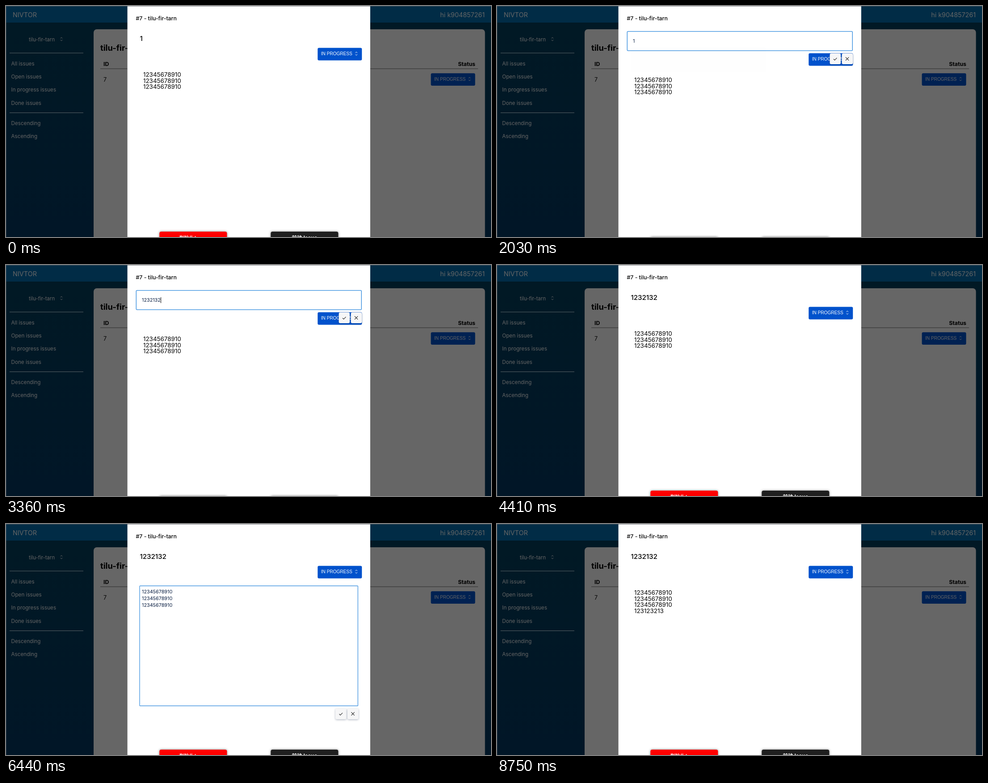
Animation, 1085 px wide and 516 px high, one loop 9.59 s. Source, as an HTML page with a canvas:

```html
<!DOCTYPE html>
<html lang="en">
<head>
<meta charset="utf-8">
<title>Issue editor</title>
<style>
html, body { margin: 0; width: 100%; height: 100%; overflow: hidden; background: #fff; }
canvas { display: block; }
</style>
</head>
<body>
<canvas id="stage" width="1085" height="516"></canvas>
<script>
const ctx = document.getElementById('stage').getContext('2d');
const LOOP = 9590;
const UI = 'Inter, "Noto Sans CJK TC", "Noto Sans CJK", sans-serif';
const ARIAL = '"Liberation Sans", Arial, sans-serif';
const PROJECT = 'tilu-fir-tarn';
const TITLE = '1232132', LINE = '12345678910', EXTRA = '123123213';

function text(str, x, y, size, color = '#000', weight = 400, align = 'left', family = UI) {
  ctx.font = `${weight} ${size}px ${family}`;
  ctx.fillStyle = color;
  ctx.textAlign = align;
  ctx.fillText(str, x, y);
  return ctx.measureText(str).width;
}

function box(x, y, w, h, fill, r = 0, shadow) {
  ctx.save();
  if (shadow) [ctx.shadowColor, ctx.shadowBlur, ctx.shadowOffsetY] = shadow;
  ctx.fillStyle = fill;
  ctx.beginPath();
  ctx.roundRect(x, y, w, h, r);
  ctx.fill();
  ctx.restore();
}

function frame(x, y, w, h, color, width, r) {
  ctx.strokeStyle = color;
  ctx.lineWidth = width;
  ctx.beginPath();
  ctx.roundRect(x + width / 2, y + width / 2, w - width, h - width, r);
  ctx.stroke();
}

function lines(color, width, ...paths) {
  ctx.strokeStyle = color;
  ctx.lineWidth = width;
  ctx.beginPath();
  for (const p of paths)
    p.forEach(([x, y], i) => i ? ctx.lineTo(x, y) : ctx.moveTo(x, y));
  ctx.stroke();
}

function chevrons(x, y, color) {
  lines(color, 1, [[x - 2.3, y - 1.6], [x, y - 3.8], [x + 2.3, y - 1.6]],
                  [[x - 2.3, y + 1.6], [x, y + 3.8], [x + 2.3, y + 1.6]]);
}

function cross(x, y, r, color) {
  lines(color, 1.1, [[x - r, y - r], [x + r, y + r]], [[x + r, y - r], [x - r, y + r]]);
}

function statusButton(x, y, fill, color) {
  box(x, y, 99, 27.8, fill, 3);
  text('IN PROGRESS', x + 7.5, y + 16.6, 10.1, color, 400, 'left', ARIAL);
  chevrons(x + 86.5, y + 12.8, color);
}

function confirmButtons(x, y, hover) {
  const shadow = ['rgba(9,30,66,.3)', 4, 1.5];
  box(x, y, 24.5, 24, hover ? '#e4e6ea' : '#f6f6f7', 3, shadow);
  box(x + 27, y, 24.5, 24, '#f6f6f7', 3, shadow);
  lines('#222', 1.1, [[x + 8.5, y + 12.5], [x + 11, y + 15], [x + 15.8, y + 9.8]]);
  cross(x + 39, y + 12, 3.6, '#222');
}

function actionButton(x, y, fill, label, size) {
  box(x, y, 151, 34, fill, 4, ['rgba(0,0,0,.5)', 5, 0]);
  text(label, x + 75.5, y + 18.5, size, '#fff', 700, 'center');
}

function caret(x, y) { box(Math.round(x), y, 1, 13, '#000'); }

const ramp = (t, start, length) => Math.min(1, Math.max(0, (t - start) / length));
const step = (t, times) => times.filter(at => t >= at).length;
const between = (t, a, b) => t >= a && t < b;
const focusColor = k => `rgb(${204 - 128 * k},${204 - 50 * k},${204 + 22 * k})`;
const hoverColor = k => `rgba(235,236,238,${k})`;

function drawPage() {
  const pale = '#666';
  const side = ctx.createLinearGradient(0, 37, 0, 516);
  side.addColorStop(0, '#011925');
  side.addColorStop(1, '#011627');
  box(0, 0, 1085, 516, side);
  box(0, 0, 1085, 37, '#012c46');
  text('NIVTOR', 15, 25, 14.5, pale);
  text('hi k904857261', 1071, 25, 14.3, pale, 400, 'right');
  text(PROJECT, 51, 79, 11.4, pale);
  chevrons(124, 74, pale);
  ['All issues', 'Open issues', 'In progress issues', 'Done issues']
    .forEach((s, i) => text(s, 11.5, 132.5 + 29.4 * i, 11.7, pale));
  ['Descending', 'Ascending'].forEach((s, i) => text(s, 11.5, 266 + 29.4 * i, 11.7, pale));
  for (const y of [104.5, 238]) box(8, y, 165, 1, '#5c6367');

  box(196, 52, 875.5, 480, '#666', 7);
  text(PROJECT, 211, 100, 18.2, '#000', 700);
  text('ID', 218, 133.5, 12.3, '#000', 700);
  text('Status', 1050, 133.5, 12.3, '#000', 700, 'right');
  box(211, 139.5, 845, 1.2, '#393939');
  text('7', 218, 168.5, 12.5);
  statusButton(950.5, 150.3, '#002152', pale);
}

function drawTitle(t, editing) {
  if (!editing) {
    const hover = t < 1050 ? ramp(t, 630, 140)
      : t < 1330 ? 1 - ramp(t, 980, 140) : t < 1540 ? ramp(t, 1260, 140) : 0;
    box(290.5, 56, 505.5, 32.5, hoverColor(hover), 2);
    text(t < 1540 ? '1' : TITLE, 299.5, 78, 15.1, '#000', 500);
    return;
  }
  frame(290.5, 56, 505.5, 44.5, focusColor(ramp(t, 1540, 70)), 1.6, 2);
  const typed = TITLE.slice(0, 1 + step(t, [2590, 2800, 2940, 3080, 3220, 3360]));
  const width = text(typed, 304, 82, 10.8, '#091e42');
  if (!between(t, 2030, 2590) && t < 3850) caret(304 + width, 72);
}

function drawSavedData(t) {
  ctx.globalAlpha = ramp(t, 2030, 210);
  box(299, 92, 303, 55.5, '#4a4a4a', 3, ['rgba(0,0,0,.4)', 10, 3]);
  text('Saved data', 311, 108.5, 8.5, '#b9b9b9', 500);
  cross(590, 105.5, 3.2, '#d5d5d5');
  text('123', 309.5, 134.5, 9.3, '#fff', 600);
  ctx.globalAlpha = 1;
}

function drawDescription(t, shift) {
  const rows = [LINE, LINE, LINE];
  if (!between(t, 5390, 8750)) {
    if (t >= 8750) rows.push(EXTRA);
    if (t < 5390) box(298.5, 137.5 + shift, 489.5, 57, hoverColor(ramp(t, 4760, 210)), 2);
    rows.forEach((s, i) => text(s, 307, 158 + shift + 13.6 * i, 13.4));
    return;
  }
  const focus = ramp(t, 5390, 210);
  frame(298.3, 137.5, 489.7, 269.5, focusColor(focus), 1.1 + 0.3 * focus, 1);
  const counts = [0, 1, 3, 4, 6, 7, 9];
  if (t >= 6580) rows.push(EXTRA.slice(0, counts[step(t, [6930, 7000, 7140, 7210, 7350, 7420])]));
  const widths = rows.map((s, i) => text(s, 304, 154.7 + 15.1 * i, 10.8, '#091e42'));
  const last = rows.length - 1;
  const hidden = between(t, 6440, 6580) || between(t, 7980, 8470);
  if (t < 5950) caret(304, 144.5);
  else if (!hidden) caret(304 + widths[last], 144.5 + 15 * last);
  confirmButtons(737, 412, t >= 8260);
}

function draw(t) {
  const editingTitle = between(t, 1540, 4200);
  const shift = editingTitle ? 12 : 0;
  drawPage();
  box(271.6, 0, 543.2, 516, '#fff');
  text('#7 - ' + PROJECT, 290.5, 32, 12.3, '#000', 500);
  drawTitle(t, editingTitle);
  statusButton(697.2, 93.6 + shift, '#0052cc', '#fff');
  drawDescription(t, shift);
  if (editingTitle) confirmButtons(744.5, 106, t >= 3920);
  if (between(t, 2030, 2940)) drawSavedData(t);
  actionButton(343.3, 503.9 + shift, '#f00', '刪除此 Issue', 10.6);
  actionButton(592.3, 503.9 + shift, '#1f1f1f', '前往 Issue', 11.8);
  box(0, 0, 1085, 1, 'rgba(90,95,100,.75)');
  box(0, 0, 1, 516, 'rgba(110,120,130,.4)');
}

function tick() {
  draw(performance.now() % LOOP);
  requestAnimationFrame(tick);
}
tick();
</script>
</body>
</html>
```
